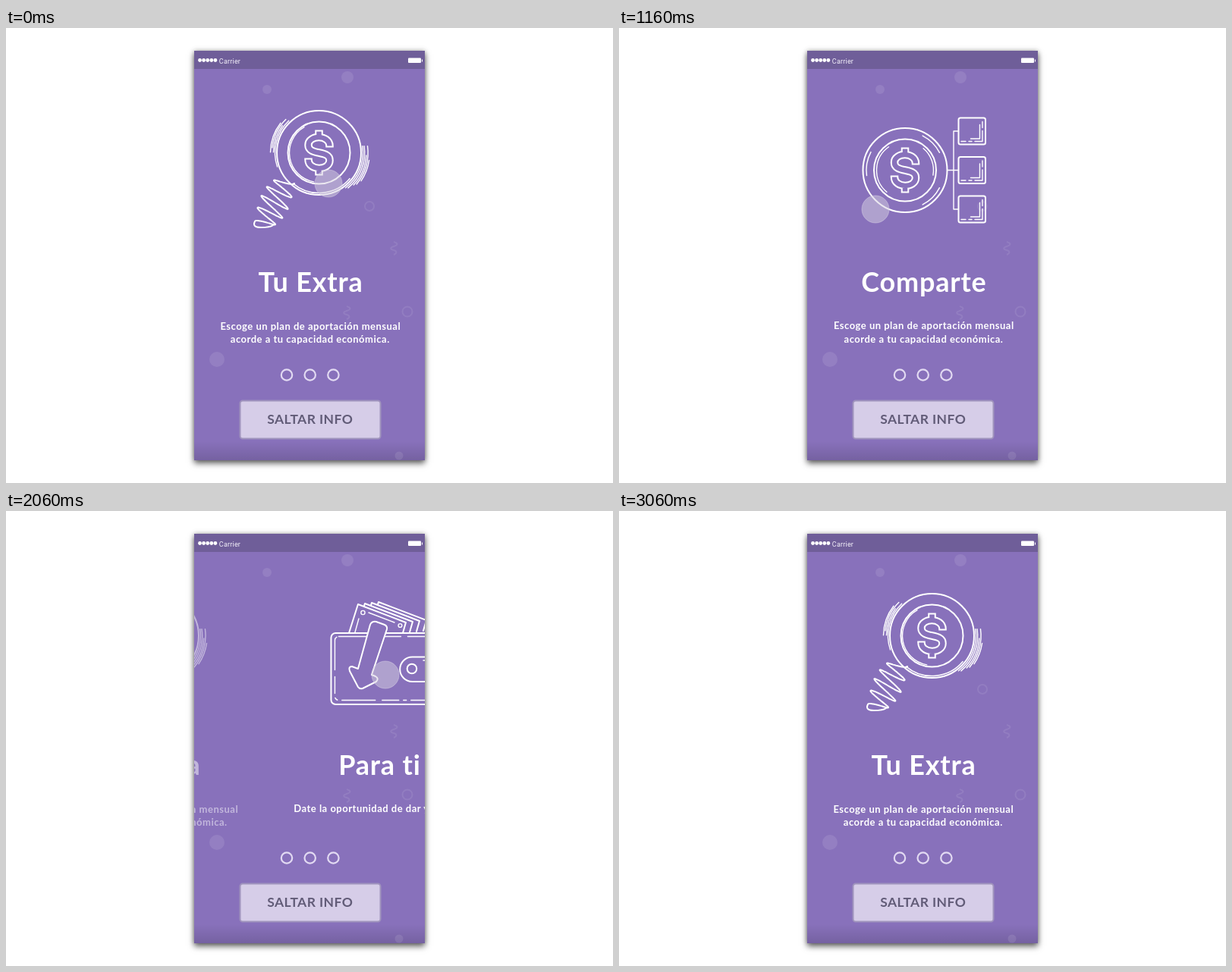
An HTML page that plays this animation: 800x600 px, repeating every 3380 ms.

```html
<!DOCTYPE html>
<html lang="es">
<head>
<meta charset="utf-8">
<style>
html, body { margin: 0; width: 100%; height: 100%; overflow: hidden; background: #fff; }
#phone {
  position: absolute; left: 248px; top: 30px; width: 304px; height: 540px;
  box-shadow: 0 4px 8px rgba(0,0,0,.6), 0 0 6px rgba(0,0,0,.25);
}
svg { position: absolute; left: 0; top: 0; }
text { font-family: Lato, "Open Sans", sans-serif; font-weight: 700; text-anchor: middle; }
.title { font-size: 36px; letter-spacing: .8px; fill: #fff; }
.body { font-size: 13px; letter-spacing: .5px; fill: #fff; }
.icon { fill: none; stroke: #fff; stroke-width: 2; stroke-linejoin: round; stroke-linecap: round; }
.thin { stroke-width: 1.4; }
.solid { fill: #8871bb; }
</style>
</head>
<body>
<div id="phone"></div>
<svg width="800" height="600" viewBox="0 0 800 600">
  <clipPath id="screen"><path d="M248 30h304v540h-304z"/></clipPath>
  <linearGradient id="shade" x2="0" y2="1">
    <stop offset="0" stop-opacity="0"/><stop offset="1" stop-opacity=".14"/>
  </linearGradient>
  <g clip-path="url(#screen)">
    <path d="M248 30h304v540h-304z" fill="#8871bb"/>
    <path d="M248 545h304v25h-304z" fill="url(#shade)"/>
    <g id="confetti"></g>

    <g class="page">
      <g class="icon" id="extra"></g>
      <text class="title" x="401.5" y="348">Tu Extra</text>
      <text class="body" x="401.3" y="397.5">Escoge un plan de aportación mensual</text>
      <text class="body" x="400.8" y="415">acorde a tu capacidad económica.</text>
    </g>

    <g class="page">
      <g class="icon" id="wallet" transform="translate(-4)"></g>
      <text class="title" x="402.5" y="348">Para ti</text>
      <text class="body" x="401.8" y="396.5">Date la oportunidad de dar y recibir.</text>
    </g>

    <g class="page">
      <g class="icon" id="share"></g>
      <text class="title" x="402" y="348">Comparte</text>
      <text class="body" x="401.8" y="396.5">Escoge un plan de aportación mensual</text>
      <text class="body" x="401.5" y="414.5">acorde a tu capacidad económica.</text>
    </g>

    <g id="dots" fill="none" stroke="#e2daf2" stroke-width="2.2"></g>
    <rect x="308.5" y="491.5" width="185" height="50" rx="3.5" fill="#d6cde8" stroke="#a094bd" stroke-width="2"/>
    <text x="400.7" y="522.3" font-size="17.5" letter-spacing=".4" fill="#625c78">SALTAR INFO</text>

    <path d="M248 30h304v24h-304z" fill="#6f5e99"/>
    <g id="signal" fill="#fff"></g>
    <text x="295" y="46.5" style="font:9px Roboto,sans-serif" letter-spacing=".2" fill="#f4f1fa">Carrier</text>
    <rect x="530" y="39.5" width="17" height="6.5" rx="1" fill="#fff"/>
    <path d="M548 41.5h1v3h-1z" fill="#fff"/>
    <circle id="touch" r="18" fill="#d8d2e2" fill-opacity=".5" stroke="#d5cee4" stroke-opacity=".5"/>
  </g>
</svg>
<script>
const LOOP = 3380, STEP = 20, WIDTH = 304;
const $ = id => document.getElementById(id);
const path = (d, attrs = '') => `<path d="${d}" ${attrs}/>`;
const circle = (x, y, r, attrs = '') => `<circle cx="${x}" cy="${y}" r="${r}" ${attrs}/>`;
const rect = (x, y, w, h, r, attrs = '') => `<rect x="${x}" y="${y}" width="${w}" height="${h}" rx="${r}" ${attrs}/>`;
const repeat = (n, make) => Array.from({ length: n }, (_, i) => make(i)).join('');
const thin = 'class="thin"', solid = 'class="solid"';

let seed = 7;
const random = (min, max) => {
  seed = seed * 16807 % 2147483647;
  return min + (max - min) * seed / 2147483647;
};

function arc(x, y, r, from, to) {
  const at = deg => {
    const a = deg * Math.PI / 180;
    return `${x + r * Math.cos(a)} ${y + r * Math.sin(a)}`;
  };
  return path(`M${at(from)}A${r} ${r} 0 0 1 ${at(to)}`, thin);
}

// Sketchy arcs fanned around an angle, shorter the further out they are
const streaks = (x, y, n, r, gap, angle, spread) => repeat(n, i => {
  const mid = angle + random(-8, 8), half = spread * random(.5, 1) * (1 - i / n / 2);
  return arc(x, y, r + gap * i, mid - half, mid + half);
});

// Outlined dollar: a wide white stroke with a narrower purple one on top
function dollar(x, y) {
  const shape = e => `M14 ${e - 9}V-9C14-24-14-24-14-10C-14 4 14-4 14 10C14 24-14 24-14 9V${9 - e}M0-20V${-28 - e}M0 20V${28 + e}`;
  return `<g transform="translate(${x} ${y})" stroke-linecap="butt">` +
    path(shape(2), 'stroke-width="10.5"') + path(shape(0), 'stroke="#8871bb" stroke-width="6.5"') + '</g>';
}

const coin = (x, y) => circle(x, y, 55.5) + circle(x, y, 41) + dollar(x, y);

// Zigzag that swells in the middle and flattens at its foot
function spring() {
  const points = Array.from({ length: 181 }, (_, i) => {
    const u = i / 180, swing = Math.cos(u * 9 * Math.PI), swell = Math.sin(u * Math.PI);
    return [369 - 30 * u + (11 + 5 * swell) * swing, 201 + 58 * u + (4 + 8 * swell) * swing];
  });
  return path('M' + points.map(p => p.map(v => v.toFixed(1))).join('L') + 'q-4 8 8 8t16-3');
}

$('extra').innerHTML = coin(412.5, 164.5) + spring() +
  streaks(412.5, 164.5, 4, 58, 2, 202, 34) + streaks(412.5, 164.5, 5, 58, 2.2, 18, 40) +
  arc(412.5, 164.5, 53, 40, 130) + arc(412.5, 164.5, 39, 100, 240);

const bill = i => path(`M${366 + 9 * i} 161L${378 + 9 * i} ${123 - i}l63 24l-4 14`, solid);
$('wallet').innerHTML = [3, 2, 1, 0].map(bill).join('') +
  circle(384.5, 134, 2.6, thin) + circle(433.5, 151, 2.4, thin) + path('M374 160l5-18M392 134l34 13', thin) +
  rect(342.5, 161, 135.5, 94, 6, solid) +
  rect(347.5, 165.5, 126, 84, 5, thin + ' stroke-dasharray="44 6 4 6 22 9"') +
  path('M481 192.5h-31.5a16.2 16.2 0 0 0 0 32.5H481q4 0 4-4v-24.5q0-4-4-4z', solid) +
  circle(449, 208, 6.3) + path('M464 197h16v7M480 209v11h-10M470 212h6', thin) +
  path('M394 150L378 208l-8-3q-5 0-3 6l11 21q2 3 6 2l18-9q4-4-1-7l-5-2 20-60q1-4-3-6l-11-4q-6-1-8 4z', solid);

const box = y => rect(447.5, y, 35.5, 35, 2.5) +
  path(`M479 ${y + 5}v8m0 4v14h-10m-4 0h-4m-4 0h-6M475.5 ${y + 9}v18.5h-12`, thin);
$('share').innerHTML = coin(377, 187.5) + repeat(3, i => box(118.5 + 51.5 * i)) +
  path('M433 187.5h14M447 136h-6v103h6', thin) +
  [-45, 45, 190].map(a => arc(377, 187.5, 51, a - 18, a + 18)).join('') +
  arc(377, 187.5, 37.5, 130, 235) + arc(377, 187.5, 37.5, -50, 10);

const dot = (x, y, r) => circle(x, y, r, 'fill="#fff" fill-opacity=".1"');
const faint = 'fill="none" stroke="#fff" stroke-opacity=".09" stroke-width="2"';
const wave = (x, y) => path(`M${x} ${y}c6 2 6 4 0 6s-4 4 0 5 5 4 0 6`, faint);
$('confetti').innerHTML = dot(344, 81, 6) + dot(450, 65, 8) + dot(278, 437, 10) + dot(518, 564, 5.5) +
  circle(479, 235, 6, faint) + circle(529, 374, 6.5, faint) + wave(511, 282) + wave(449, 367);

$('dots').innerHTML = repeat(3, i => circle(370 + 30.7 * i, 457.5, 7.2));
$('signal').innerHTML = repeat(5, i => circle(255.5 + 5.1 * i, 42.5, 2.4));

// drag: finger travel while swiping; rest: where it ends up relative to the swipe's start
const swipes = [
  { start: 80, dir: 1, drag: [-85, 20], rest: [-5, 11] },
  { start: 545, dir: 1, drag: [-82, 26], rest: [-82, 23] },
  { start: 1440, dir: -1, drag: [90, -15], rest: [72, -23] },
  { start: 1960, dir: -1, drag: [90, 0], rest: [-2, 22] }
];
const pages = [...document.querySelectorAll('.page')];
const clamp = v => Math.max(0, Math.min(1, v));
const ease = v => { const u = clamp(v); return u * u * (3 - 2 * u); };
const glide = ms => 1 - Math.exp(-((Math.max(0, ms) / 158) ** 2.29));

function finger(t, axis) {
  return swipes.reduce((sum, { start, drag, rest }) => {
    const out = ease((t - start) / 100), back = ease((t - start - 160) / 140);
    return sum + drag[axis] * out + (rest[axis] - drag[axis]) * back;
  }, [425, 205][axis]);
}

function draw(now) {
  const t = Math.floor(now % LOOP / STEP) * STEP;
  const pos = swipes.reduce((sum, s) => sum + s.dir * glide(t - s.start), 0);
  pages.forEach((page, i) => {
    const d = i - pos;
    page.setAttribute('transform', `translate(${d * WIDTH})`);
    page.setAttribute('opacity', clamp(1.4 - 1.3 * Math.abs(d)));
  });
  $('touch').setAttribute('transform', `translate(${finger(t, 0)} ${finger(t, 1)})`);
  $('touch').setAttribute('opacity', 1 - ease((t - 2780) / 280));
}

const start = performance.now();
function tick() {
  draw(performance.now() - start);
  requestAnimationFrame(tick);
}
tick();
</script>
</body>
</html>
```
